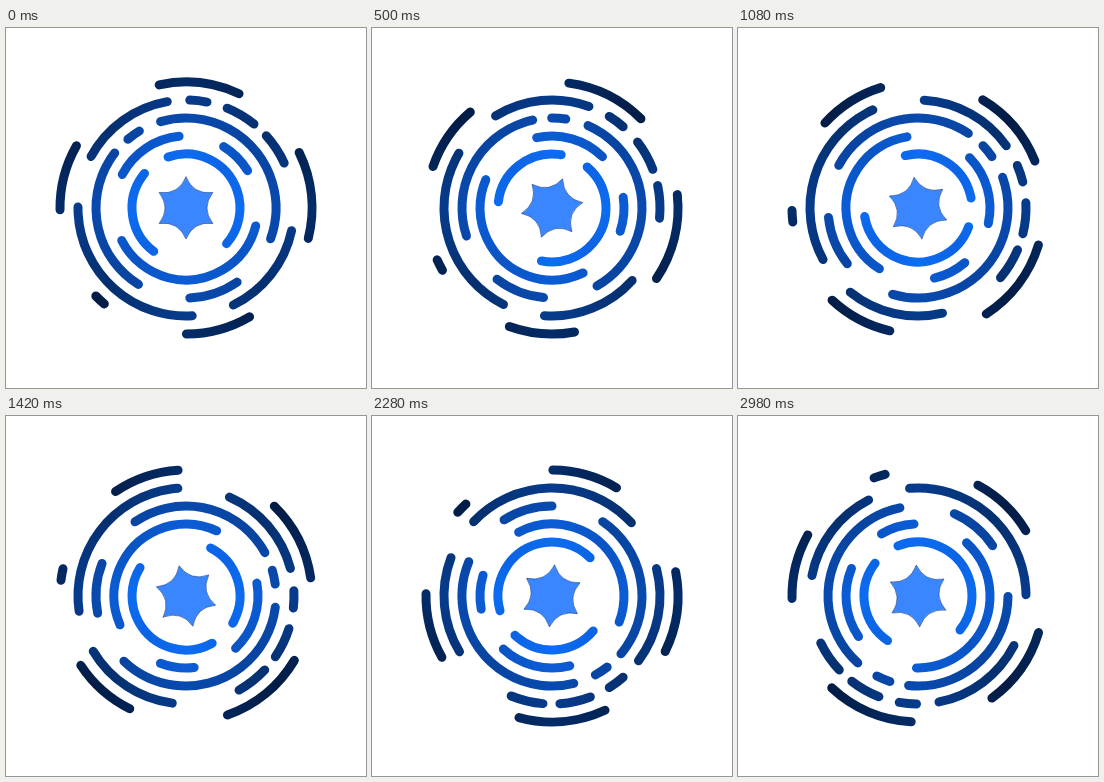
Write an HTML page with a canvas that moves like this. It is 360 px wide and 360 px high and loops after 3000 ms.

```html
<!DOCTYPE html>
<html lang="en">
<head>
<meta charset="utf-8">
<title>Orbiting arcs</title>
<style>
  html, body { margin: 0; width: 100%; height: 100%; overflow: hidden; background: #fff; }
  canvas { display: block; }
</style>
</head>
<body>
<canvas id="stage" width="360" height="360"></canvas>
<script>
const ctx = document.getElementById('stage').getContext('2d');
const LOOP = 3000, STEP = 20, RAD = Math.PI / 180;

// speed in degrees per second; arcs as [start, end] in degrees, clockwise from the right
const rings = [
  { r: 126, speed: 40, axis: '#042c68', diagonal: '#021c45',
    arcs: [[257.7, 294.9], [333.9, 374], [59.7, 89.8], [130.4, 135.7], [179.2, 209.6]] },
  { r: 108, speed: 60, axis: '#073b8c', diagonal: '#05306f',
    arcs: [[208.5, 260], [272, 281.2], [292.4, 309], [318, 335.4], [12.1, 64], [86.7, 180.5]] },
  { r: 90, speed: 80, axis: '#094aae', diagonal: '#0844a0',
    arcs: [[229.8, 238.8], [253.6, 380], [55.4, 87.6], [121.9, 217.6]] },
  { r: 72, speed: 100, axis: '#0b5cd6', diagonal: '#0a54c4',
    arcs: [[207.7, 264.5], [301.5, 328.8], [14.4, 153.2]] },
  { r: 54, speed: 120, axis: '#0d6cf2', diagonal: '#0b64e4',
    arcs: [[250.6, 401.3], [126.7, 219.8]] }
];

// each ring is a little darker on the diagonals
for (const ring of rings) {
  ring.paint = ctx.createConicGradient(0, 0, 0);
  for (let i = 0; i <= 8; i++) {
    ring.paint.addColorStop(i / 8, i % 2 ? ring.diagonal : ring.axis);
  }
}

const polar = (r, deg) => [r * Math.cos(deg * RAD), r * Math.sin(deg * RAD)];

function drawRing({ r, speed, paint, arcs }, sec) {
  const turn = speed * sec;
  ctx.strokeStyle = paint;
  ctx.lineWidth = 9;
  ctx.lineCap = 'round';
  for (const [from, to] of arcs) {
    ctx.beginPath();
    ctx.arc(0, 0, r, (from + turn) * RAD, (to + turn) * RAD);
    ctx.stroke();
  }
}

function drawStar(sec) {
  const turn = 160 * sec - 90;
  ctx.beginPath();
  ctx.moveTo(...polar(31, turn));
  for (let a = 0; a < 360; a += 60) {
    ctx.quadraticCurveTo(...polar(15, turn + a + 30), ...polar(31, turn + a + 60));
  }
  ctx.closePath();
  ctx.fillStyle = '#3a86ff';
  ctx.fill();
  ctx.strokeStyle = '#123a80';
  ctx.lineWidth = 0.6;
  ctx.stroke();
}

function draw(now) {
  const sec = Math.floor(now % LOOP / STEP) * STEP / 1000;
  ctx.setTransform(1, 0, 0, 1, 180, 180);
  ctx.fillStyle = '#fff';
  ctx.fillRect(-180, -180, 360, 360);
  for (const ring of rings) drawRing(ring, sec);
  drawStar(sec);
}

const start = performance.now();
function tick() {
  draw(performance.now() - start);
  requestAnimationFrame(tick);
}
tick();
</script>
</body>
</html>
```
